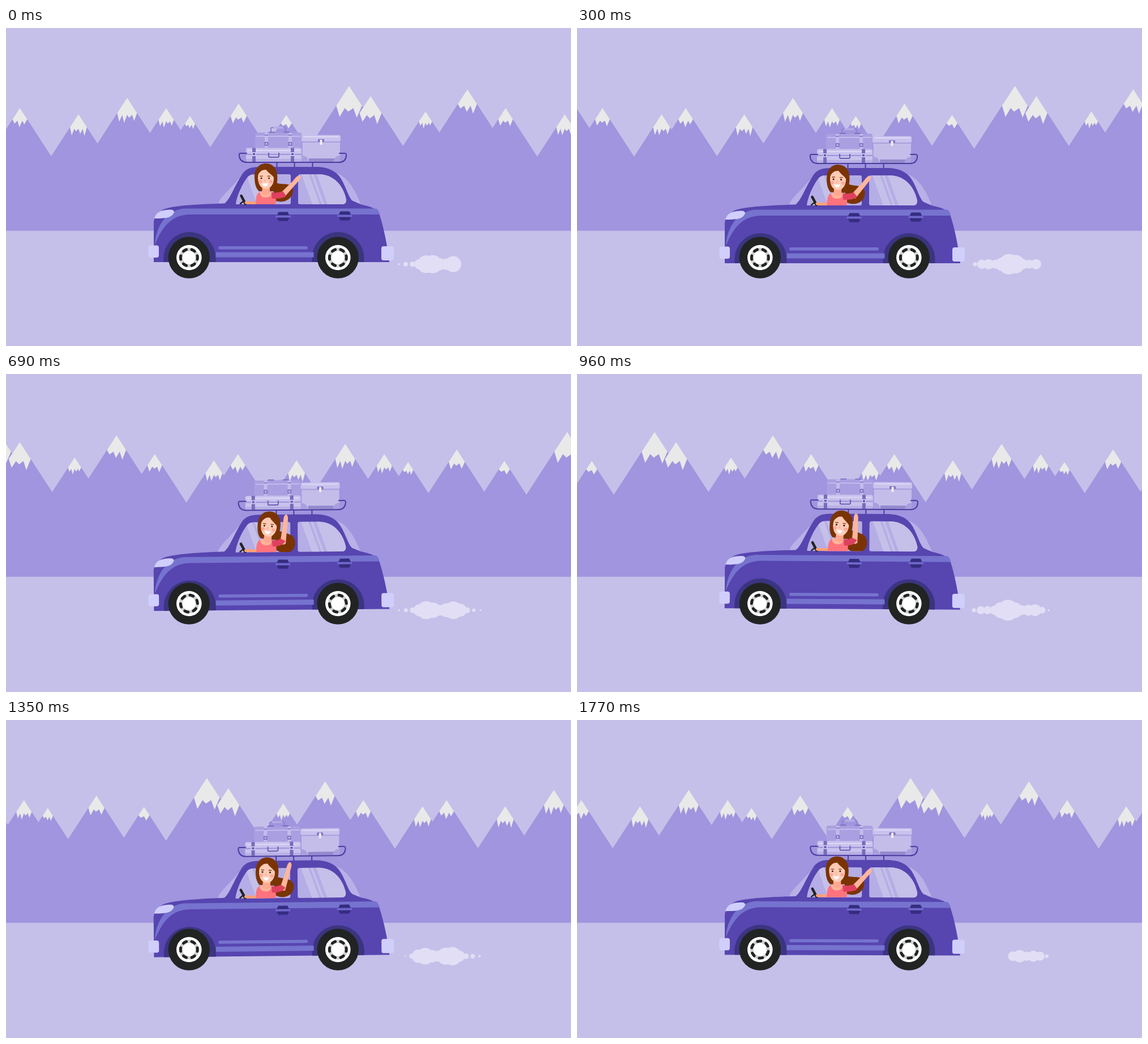
Write an HTML page with a canvas that moves like this. It is 998 px wide and 561 px high and loops after 1.8 s.

```html
<!DOCTYPE html>
<html lang="en">
<head>
<meta charset="utf-8">
<title>Road trip</title>
<style>
html, body { margin: 0; width: 100%; height: 100%; overflow: hidden; background: #c5c0e9; }
canvas { display: block; }
</style>
</head>
<body>
<canvas id="stage" width="998" height="561"></canvas>
<script>
const c = document.getElementById('stage').getContext('2d');
const LOOP = 1800, STEP = 30, SPAN = 1005, TAU = Math.PI * 2, SLOPE = 1.54;
const SKY = '#c5c0e9', HILL = '#a095de', BODY = '#5745b0', TRIM = '#7673cf', GLASS = '#b5ade5',
  DARK = '#3b3580', LAMP = '#d0cefb', HAIR = '#7a3403', SKIN = '#ffb59c', INK = '#222423';

const mix = (a, b, k) => a + (b - a) * k;
const clamp = (v, lo, hi) => Math.min(hi, Math.max(lo, v));
const smooth = k => k * k * (3 - 2 * k);
// 0 at the loop's ends, 1 in the middle
const swing = t => (1 - Math.cos(t / LOOP * TAU)) / 2;

function shape(d, color) {
  c.fillStyle = color;
  c.fill(new Path2D(d));
}
function line(d, color, width, cap = 'butt') {
  c.strokeStyle = color;
  c.lineWidth = width;
  c.lineCap = cap;
  c.lineJoin = 'round';
  c.stroke(new Path2D(d));
}
function box(x, y, w, h, color, r = 0) {
  c.fillStyle = color;
  c.beginPath();
  c.roundRect(x, y, w, h, r);
  c.fill();
}
function disc(x, y, r, color) {
  c.fillStyle = color;
  c.beginPath();
  c.arc(x, y, Math.max(0, r), 0, TAU);
  c.fill();
}
function clipTo(d, draw) {
  c.save();
  c.clip(new Path2D(d));
  draw();
  c.restore();
}

// x, height of the top, depth of the snow, teeth
const peaks = [
  [24.5, 141, 20, 3], [128, 152, 23, 4], [214, 123, 27, 4], [283, 141, 21, 4], [325, 155, 14, 3],
  [411, 133, 22, 3], [495, 153, 15, 2], [606, 102, 35, 3], [644, 120, 30, 3],
  [741, 147, 18, 4], [815, 108, 26, 3], [882.5, 141, 20, 3], [987, 152, 23, 4]
];

function mountain([, y, depth, teeth], x) {
  const half = (358 - y) / SLOPE;
  shape(`M${x} ${y}L${x + half} 358H${x - half}Z`, HILL);
}

function snowcap([seed, y, depth, teeth], x) {
  const w = depth / SLOPE, gap = 2 * w / teeth;
  let d = `M${x} ${y}L${x - w} ${y + depth}`;
  for (let j = 0; j < teeth; j++) {
    const left = x - w + j * gap;
    const tip = depth * (1.5 + 0.2 * Math.sin(seed + 2 * j));
    const notch = depth * (j < teeth - 1 ? 1.12 : 1);
    d += `L${left + gap * 0.4} ${y + tip}L${left + gap} ${y + notch}`;
  }
  shape(d + 'Z', '#e9e9e9');
}

function scenery(t) {
  c.fillStyle = SKY;
  c.fillRect(0, 0, 998, 561);
  for (const part of [mountain, snowcap]) {
    for (let k = -2; k < 2; k++) {
      for (const p of peaks) part(p, p[0] + SPAN * (k + t / LOOP));
    }
  }
  box(0, 357.7, 998, 204, SKY);
}

function smoke(t) {
  const cutoff = 728 + 0.2 * (t - 1590); // the exhaust dies down behind this point
  for (let i = 0; i < 17; i++) {
    const x = 790 - 12 * i + 0.07 * t;
    const k = (x - 684) / 164;
    if (k <= 0 || k >= 1) continue;
    const full = (14 + 4.5 * Math.cos((i - 3.7) / 4.4 * TAU)) * clamp((17 - i) / 4, 0, 1);
    const r = full * Math.sin(Math.PI * k) ** 1.4 * clamp((x - cutoff) / 12, 0, 1);
    disc(x, 416.7, r, '#e2def5');
  }
}

function luggage(t) {
  const lift = clamp(5 + 14 * Math.cos((t - 1730) / LOOP * TAU), 0, 9.5);
  const top = 185 - lift;
  line(`M468 187V${top + 2}Q468 ${top} 471 ${top}H491Q494 ${top} 494 ${top + 2}V187`, '#8d82cf', 2);
  box(472, top - 1.5, 18, 3.5, '#b5ade5', 1);
  for (const x of [464, 490]) box(x, 183, 11, 3, '#7065b8', 1);

  box(440, 184.5, 82, 27, '#aa9fe0', 4);
  box(442, 190, 78, 2, '#c3bcec');
  for (const x of [457, 499]) {
    box(x, 185, 6, 26, '#c3bcec');
    box(x - 0.5, 201, 7, 7, '#8075c4', 1);
    box(x + 1.5, 203, 3, 3, '#c3bcec');
    box(x, 188, 6, 2, '#8d82cf');
  }

  box(424, 211.5, 98, 24.5, '#c8c2ed', 3);
  box(424, 222, 98, 2, '#9d93d8');
  box(427, 215, 92, 2, '#ded9f6');
  box(424, 231, 98, 5, '#b7afe4', 2);
  for (const x of [435, 503]) {
    box(x, 211.5, 6, 24.5, '#776bbd');
    box(x - 1, 219, 8, 7, '#c8c2ed', 1);
    box(x + 1, 221, 4, 3, '#5b4ea9');
  }
  line('M464 220V226Q464 228 466 228H480Q482 228 482 226V220', '#6a5eb4', 2);

  box(523.5, 199, 66.5, 37, '#c4bdea', 2);
  box(535, 230, 45, 6, '#9389ce');
  shape('M523.5 236V225Q532 225 535 236ZM590 236V225Q581 225 578 236Z', '#a99fdd');
  box(522, 188.7, 69, 12, '#c8c2ed', 3);
  box(525, 191, 63, 2, '#ded9f6');
  box(523, 200, 67, 2, '#a99fdd');
  box(551, 196, 11, 5, '#8075c4', 1);
  box(554.5, 197, 4, 9, '#f0edfb', 1);

  line('M425 221H414Q411 221 412 226C413 233 417 237 426 237H588C596 237 600 233 601 226Q602 221 598 221H589', '#4a3ba0', 2, 'round');
  for (const x of [478.5, 509.5, 541.5]) line(`M${x} 237V246`, '#4a3ba0', 2);
}

function pane(d, shines) {
  shape(d, GLASS);
  clipTo(d, () => {
    for (const [x, w] of shines) shape(`M${x} 258H${x + w}L${x + w + 19} 311H${x + 19}Z`, SKY);
  });
}

function shell() {
  shape('M375 310C376 301 391 289 416 261L424 250L430 311ZM584 256C603 263 615 282 626 309L600 311Z', '#b8b0e7');
  shape(`M261 413V342Q262 329 278 320C292 314 330 311 386 309.5
    C396 302 402 282 416 260C423 248 432 245 450 245H547C570 245 585 253 593 268
    C603 286 607 305 615 306L626 311C643 315 656 318 660 330C668 355 674 386 677 413Z`, BODY);
  pane('M406 311C407 296 420 269 429 261Q433 258 439 258H500Q503 258 503 261V308Q503 311 500 311Z', [[424, 12], [440, 4]]);
  pane('M516 262Q516 258 520 258H552C579 258 596 278 601 303Q601 311 594 311H519Q516 311 516 308Z', [[522, 13], [539, 4], [549, 60]]);
  shape('M263 382C265 349 284 321 315 318.5H654Q659 322 660 329H325C296 330 279 344 263 382Z', TRIM);
  shape('M262 336C265 325 273 320.5 292 320.5Q297 321 297 325C293 334 286 336 262 336Z', LAMP);
  for (const x of [324.5, 586.5]) {
    shape(`M${x - 46} 413V406A46 46 0 0 1 ${x + 46} 406V413Z`, DARK);
  }
  box(375, 385, 158, 5.5, TRIM, 2.7);
  box(370.5, 395.5, 173, 9, TRIM);
  for (const [x, y] of [[489.5, 332.5], [598.5, 331.5]]) {
    shape(`M${x - 12} ${y}L${x - 8} ${y - 8}H${x + 8}L${x + 12} ${y}L${x + 8} ${y + 8}H${x - 8}Z`, '#352c80');
    box(x - 13.5, y - 2, 27, 4, '#6f68cc', 2);
  }
  box(251.5, 383.5, 18.5, 21.5, LAMP, 4);
  box(663, 385, 22, 25, LAMP, 4);
}

function head(p) {
  c.save();
  c.translate(459 + 3.5 * p, 291);
  c.rotate(0.13 * p);
  c.translate(-459, -291);
  shape('M459 239C446 239 439 249 439 263C439 275 442 284 447 288H473C479 280 480 268 479 259C478 246 470 239 459 239Z', HAIR);
  shape('M453 278H466V292Q459 298 452 292Z', '#ffa88f');
  shape('M445 264C445 253 451 250 459 250C468 250 473 255 473 266C473 277 466 284 459 284C451 284 445 276 445 264Z', '#ffcbb5');
  shape('M443 267C444 257 449 253 458 247C461 255 469 257 475 266L475 252L460 242L446 248Z', HAIR);
  for (const x of [449, 468]) disc(x, 271, 3, '#ffa79b');
  for (const x of [451, 464.5]) {
    disc(x, 265, 1.6, '#4b2411');
    line(`M${x - 2.3} 261.3H${x + 2.3}`, HAIR, 1.3, 'round');
  }
  line('M457.5 266L456.5 270H458.5', '#f3a38d', 1);
  shape('M452.5 273.5Q458 275 463 273.5Q462 279.5 457.5 279.5Q453.5 279 452.5 273.5Z', '#fff');
  c.restore();
}

function driver(t) {
  const p = swing(t + 30);
  const wave = smooth(swing(t - 60));
  const pt = (x0, y0, x1, y1) => `${mix(x0, x1, p)} ${mix(y0, y1, p)} `;
  const shift = 1.5 * p;

  line('M415.5 296L423 310', INK, 4.5, 'round');
  line('M420 305L414 310', INK, 2.5, 'round');
  clipTo('M400 200H560V311H400Z', () => {
    shape('M' + pt(472, 268, 478, 268) +
      'C' + pt(478, 281, 485, 281) + pt(502, 269, 511, 274) + pt(507, 283, 512, 295) +
      'C' + pt(509, 299, 513, 315) + pt(494, 312, 489, 319) + pt(473, 304, 477, 306) + 'Z', HAIR);
    line('M424 308L446 309', '#ffa176', 5, 'round');
    c.save();
    c.translate(shift, 0);
    shape('M441 312C441 300 442 292 449 289H469C476 291 478 300 476 312Z', '#ff737d');
    shape('M448 289H469Q469 299 459 299Q449 299 448 289Z', SKIN);
    c.restore();
  });

  const reach = mix(39, 44, wave);
  c.save();
  c.translate(490, 293);
  c.rotate(mix(0.75, 0.05, wave));
  shape(`M-5 3L-3.5 ${10 - reach}Q-5 ${-reach - 2} -1 ${-reach - 5}Q4.5 ${-reach - 5} 4 ${8 - reach}L5 3Q0 7 -5 3Z`, SKIN);
  c.restore();
  shape(`M${469 + shift} 290C477 291 482 290 ${mix(489, 485, wave)} ${mix(288, 287, wave)}
    L${mix(495, 494, wave)} ${mix(296, 291, wave)}C489 301 480 301 ${470 + shift} 301Z`, '#df405f');
  head(p);
}

function car(t) {
  const rock = Math.sin(t / 600 * TAU);
  const drop = (2.2 + 1.2 * rock) * (1 - Math.exp(-t / 100));
  c.save();
  c.translate(469, 370 + drop);
  c.rotate(-0.0104 * rock);
  c.translate(-469, -370);
  luggage(t);
  shell();
  driver(t);
  c.restore();
}

function wheel(x, t) {
  c.save();
  c.translate(x, 405);
  disc(0, 0, 36.7, INK);
  disc(0, 0, 22.3, '#fff');
  c.rotate(-t / LOOP * TAU * 4);
  disc(0, 0, 17.5, '#d0d0d0');
  c.strokeStyle = INK;
  c.lineWidth = 5;
  c.lineCap = 'round';
  for (let i = 0; i < 6; i++) {
    const a = i * TAU / 6;
    c.beginPath();
    c.arc(0, 0, 15, a - 0.2, a + 0.2);
    c.stroke();
  }
  disc(0, 0, 11.5, '#fff');
  c.restore();
}

function frame(now) {
  const t = Math.floor((now % LOOP) / STEP) * STEP;
  scenery(t);
  smoke(t);
  car(t);
  wheel(323.3, t);
  wheel(586.3, t);
}

const start = performance.now();
function tick() {
  frame(performance.now() - start);
  requestAnimationFrame(tick);
}
tick();
</script>
</body>
</html>
```
